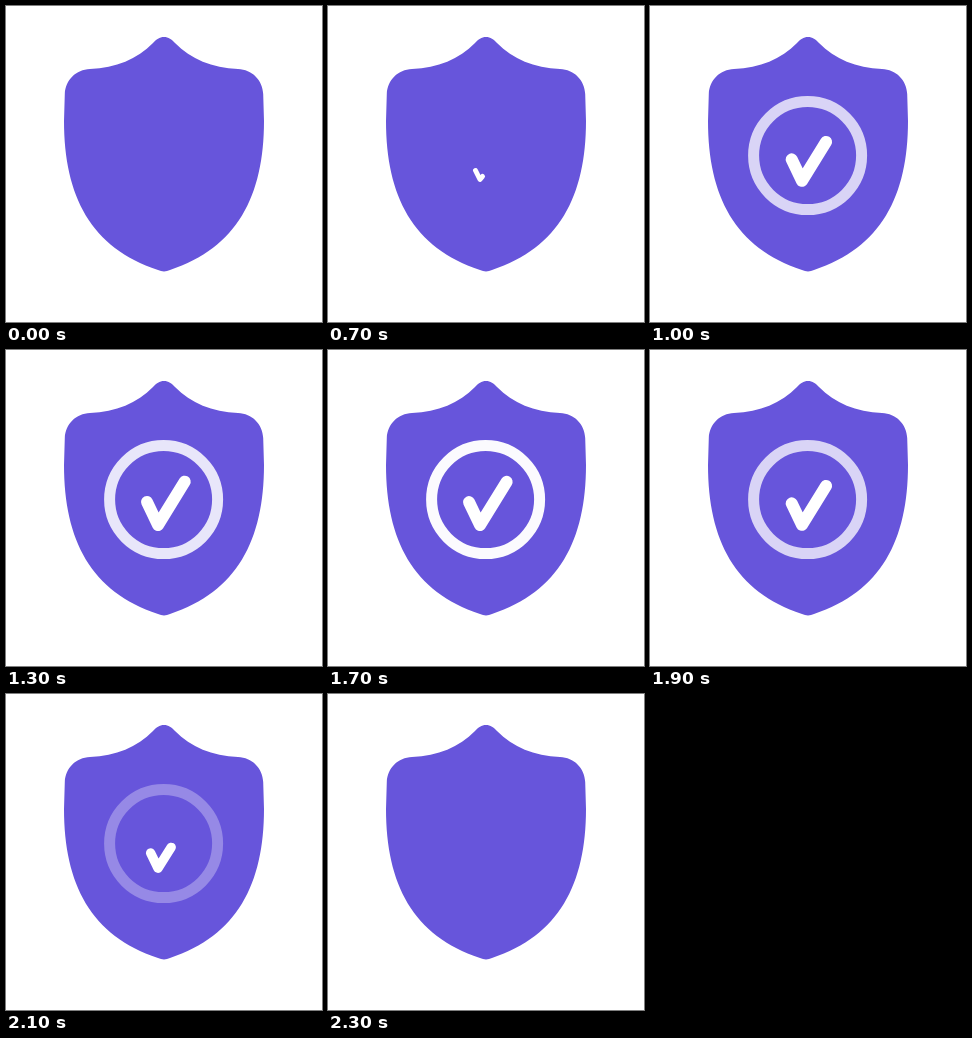
Recreate the animation shown at these times as an HTML page. Size 316 by 316 pixels, loop 2.9 s.

```html
<!DOCTYPE html>
<html lang="en">
<head>
<meta charset="utf-8">
<title>Shield check</title>
<style>
  html, body { margin: 0; width: 100%; height: 100%; overflow: hidden; background: #fff; }
  svg { display: block; width: 100%; height: 100%; }
  .line { fill: none; stroke: #fff; stroke-linecap: round; stroke-linejoin: round; }
</style>
</head>
<body>
<svg viewBox="0 0 316 316">
  <path id="half" fill="#6755db" d="M158 31C153.5 31 150.3 33.5 147 37C131 53 110 62 84 63
    C70 63.5 59.5 74 58.8 88L58 115C58 190 85 242 152 264Q155 265.4 158 265.4Z"/>
  <use href="#half" transform="matrix(-1 0 0 1 316 0)"/>
  <circle id="ring" class="line" cx="157.6" cy="149.6" r="54" stroke-width="11"/>
  <path id="check" class="line"/>
</svg>
<script>
  const LOOP = 2900, STEP = 100, BEGIN = 700, GROW = 600, HOLD_END = 1500;
  const ring = document.getElementById('ring');
  const check = document.getElementById('check');

  const easeOut = (u, power) => 1 - (1 - u) ** power;
  const mix = (a, b, p) => a + (b - a) * p;

  function draw(now) {
    const t = Math.floor(now % LOOP / STEP) * STEP;
    // The second half replays the first one backwards
    const raw = (Math.min(t, LOOP - t) - BEGIN) / GROW;
    const u = Math.max(0, Math.min(1, raw));

    // The ring stays slightly clear until the hold is over
    ring.setAttribute('opacity', Math.min(easeOut(u, 2), t < HOLD_END ? 0.85 : 1));

    const p = easeOut(u, 3.2);
    const left = [mix(147.5, 141, p), mix(164.5, 152, p)];
    const corner = [152, mix(173.5, 175, p)];
    const right = [mix(154.5, 178.7, p), mix(170.5, 131.7, p)];
    check.setAttribute('visibility', raw < 0 ? 'hidden' : 'visible');
    check.setAttribute('d', `M${left}L${corner}L${right}`);
    check.setAttribute('stroke-width', Math.min(12, mix(5, 15, p)));
  }

  const start = performance.now();
  function tick() {
    draw(performance.now() - start);
    requestAnimationFrame(tick);
  }
  tick();
</script>
</body>
</html>
```
